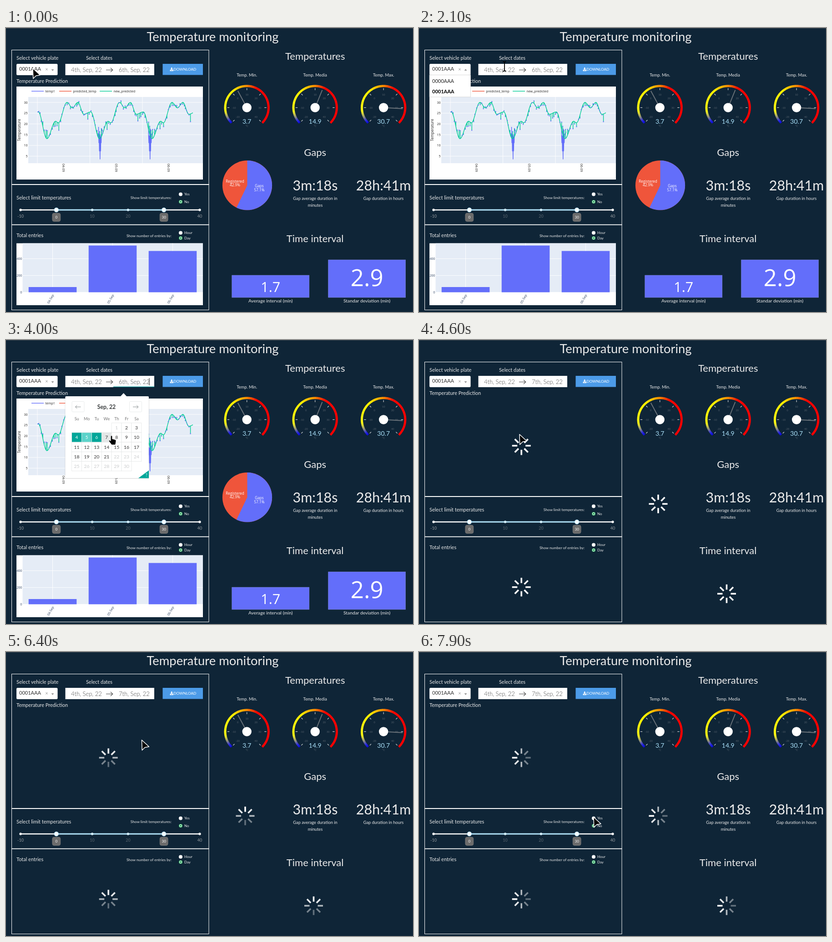
An HTML page that plays this animation: 895x626 px, repeating every 8 s.

```html
<!DOCTYPE html>
<html lang="en">
<head>
<meta charset="utf-8">
<title>Temperature monitoring</title>
<style>
html, body { margin: 0; width: 100%; height: 100%; overflow: hidden; background: #0f2537; }
svg { display: block; width: 895px; height: 626px; font-family: Lato, sans-serif; }
.plot { font-family: "Open Sans", sans-serif; }
</style>
</head>
<body>
<svg id="stage" viewBox="0 0 895 626" xmlns="http://www.w3.org/2000/svg"></svg>
<script>
const LOOP = 8000;
const BLUE = '#636efa', RED = '#ef553b', GREEN = '#00cc96', TEAL = '#00a699';
const LIGHT = '#ebebeb', PALE = '#abe2fb', INK = '#2a3f5f', PLOT = '#e5ecf6';

// Markup helpers
const text = (s, x, y, size, fill = LIGHT, anchor = 'start', extra = '') =>
  `<text x="${x}" y="${y}" font-size="${size}" fill="${fill}" text-anchor="${anchor}" ${extra}>${s}</text>`;
const mid = (s, x, y, size, fill, extra) => text(s, x, y, size, fill, 'middle', extra);
const rect = (x, y, x2, y2, fill, extra = '') =>
  `<rect x="${x}" y="${y}" width="${x2 - x}" height="${y2 - y}" fill="${fill}" ${extra}/>`;
const line = (x1, y1, x2, y2, stroke, w = 1, extra = '') =>
  `<line x1="${x1}" y1="${y1}" x2="${x2}" y2="${y2}" stroke="${stroke}" stroke-width="${w}" ${extra}/>`;
const circle = (x, y, r, fill, extra = '') => `<circle cx="${x}" cy="${y}" r="${r}" fill="${fill}" ${extra}/>`;
const path = (d, fill = 'none', extra = '') => `<path d="${d}" fill="${fill}" ${extra}/>`;
const group = (id, body, extra = '') => `<g id="${id}" ${extra}>${body}</g>`;
const polar = (x, y, r, deg) => {
  const a = deg * Math.PI / 180;
  return [x + r * Math.sin(a), y - r * Math.cos(a)];
};

function randomizer(seed) {
  return () => (seed = (seed * 16807) % 2147483647) / 2147483647;
}

// Piecewise interpolation over rows of [key, value...]
function along(rows, key, ease = u => u) {
  let i = 0;
  while (i < rows.length - 2 && key >= rows[i + 1][0]) i++;
  const a = rows[i], b = rows[i + 1];
  const u = ease(Math.min(1, Math.max(0, (key - a[0]) / (b[0] - a[0]))));
  return a.slice(1).map((v, k) => v + (b[k + 1] - v) * u);
}
const wave = u => (1 - Math.cos(Math.PI * u)) / 2;

function frame() {
  return rect(0, 0, 895, 626, '#0f2537') + rect(0, 0, 895, 1, '#3d4650') +
    mid('Temperature monitoring', 454.5, 28.5, 27.4) +
    rect(12.5, 48.5, 446, 621.5, 'none', 'stroke="#fff"') +
    line(12, 345, 446.5, 345, '#fff', 1.8) + line(12, 433.7, 446.5, 433.7, '#fff', 1.8) +
    text('Select vehicle plate', 23, 70, 11) + mid('Select dates', 205, 70, 11) +
    text('Temperature Prediction', 23, 121.3, 11) +
    mid('Temperatures', 679.7, 70, 22) + mid('Gaps', 679.7, 281.5, 22) +
    mid('Time interval', 679.7, 472, 22) +
    mid('3m:18s', 680, 357.5, 30.5) + mid('28h:41m', 830, 357.5, 30.5) +
    mid('Gap average duration in', 680, 379, 9.3) + mid('minutes', 680, 394, 9.3) +
    mid('Gap duration in hours', 830, 379, 9.3);
}

function controls() {
  return rect(23, 79, 113.5, 104, '#fff', 'rx="2.5"') +
    text('0001AAA', 29, 94.3, 11, '#333') + mid('×', 89.5, 94.6, 11, '#999') +
    path('', '#888', 'id="chevron"') +
    rect(130.5, 79, 326, 104, '#fff') +
    text('4th, Sep, 22', 143, 96.7, 13, '#484848', 'start', 'font-weight="300"') +
    text('6th, Sep, 22', 248, 96.7, 13, '#484848', 'start', 'font-weight="300" id="endDate"') +
    path('M220 92.5H234.5M230 88L234.7 92.5L230 97', 'none', 'stroke="#484848" stroke-width="1.1"') +
    rect(344.5, 79, 433, 103.5, '#4c9be8') +
    path('M363.2 87h2.2v3h2l-3.1 3.1l-3.1-3.1h2zM360.6 92.3h1.7l2 1.6l2-1.6h1.7v2.6h-7.4z', '#fff') +
    text('DOWNLOAD', 368.2, 94.2, 8.3, '#fff');
}

function radio(label, x, y, on) {
  const dot = on
    ? circle(x, y, 4, '#2fae62') + circle(x, y, 2.9, '#d9f7e4') + circle(x, y, 1.8, '#14924a')
    : circle(x, y, 4, '#fff');
  return dot + text(label, x + 8, y + 2.8, 8);
}

function limits() {
  let s = text('Select limit temperatures', 23, 378, 11) +
    text('Show limit temperatures:', 364, 377.2, 8.25, LIGHT, 'end') +
    radio('Yes', 384, 366.5) + radio('No', 384, 383, true) +
    text('Total entries', 23, 461.3, 11) +
    text('Show number of entries by:', 364, 460.5, 8.25, LIGHT, 'end') +
    radio('Hour', 384, 451.5) + radio('Day', 384, 463, true) +
    line(32, 401, 426, 401, '#fff', 2.7) + line(111, 401, 347.5, 401, PALE, 2.7);
  for (let v = -10; v <= 40; v += 10) {
    const x = 32 + (v + 10) * 7.88;
    if (v === 0 || v === 30) {
      s += circle(x, 401, 4.8, '#f4fbff', `stroke="${PALE}" stroke-width="1"`) +
        rect(x - 9, 408, x + 9, 426.5, '#6c6c6c', 'rx="4" stroke="#7b7b7b" stroke-width=".7"') +
        mid(v, x, 420.3, 8, '#fff');
    } else {
      const inside = v > 0 && v < 30;
      s += circle(x, 401, 2.7, inside ? '#d5f1fd' : '#fff') +
        mid(v, x, 418, 9, inside ? '#5c6770' : '#9a9fa3');
    }
  }
  return s;
}

const HEAT = [[0, 10, 10, 215], [.03, 40, 40, 225], [.075, 150, 150, 120], [.13, 255, 250, 20],
  [.36, 255, 240, 0], [.5, 255, 140, 0], [.6, 255, 5, 0], [1, 255, 0, 0]];

function gauge(title, x, value) {
  const y = 175.5, N = 90, angle = u => -135 + 270 * u;
  let s = mid(title, x, 107, 9.3);
  for (let i = 0; i < N; i++) {
    const a = polar(x, y, 47.7, angle(i / N));
    const b = polar(x, y, 47.7, angle(Math.min(1, (i + 1.2) / N)));
    const rgb = along(HEAT, (i + .5) / N).map(Math.round);
    s += line(...a, ...b, `rgb(${rgb})`, 4.8);
  }
  for (let i = 0; i <= 6; i++) {
    const a = angle(i / 6), [lx, ly] = polar(x, y, 28.5, a);
    s += line(...polar(x, y, 38.5, a), ...polar(x, y, 43, a), '#cfd3d6', 1.2) +
      mid(-20 + i * 10, lx, ly + 2, 5.6, '#56626d');
  }
  return s + line(x, y, ...polar(x, y, 42, angle((value + 20) / 60)), '#6b737a', 1.9) +
    circle(x, y, 10.2, '#fff') + mid(value, x, 210.7, 14, PALE) + mid('°C', x, 218, 5.5, '#56626d');
}

// One day of the predicted curve: [pixels after midnight, y]
const DAY = 115.5;
const DAILY = [[2, 185], [21, 244], [40, 205.5], [46, 209], [65, 164], [77, 176], [89, 164],
  [102, 190], [DAY + 2, 185]];
const predicted = x => along(DAILY, x < 2 ? x + DAY : ((x - 2) % DAY) + 2, wave)[0];

function temperatureChart() {
  let s = rect(23, 129, 433, 334, '#fff') + rect(49, 152, 433, 298, PLOT);
  for (let v = 5; v <= 30; v += 5) {
    const y = 164 + (30 - v) * 4.74;
    s += line(49, y, 433, y, '#fff', .9) + text(v, 47.5, y + 2.6, 7, '#222', 'end');
  }
  for (let i = 0; i < 3; i++) {
    const x = 69 + i * DAY, lx = x + DAY / 2;
    s += line(x, 152, x, 298, '#fff', .9) +
      mid(`0${4 + i}-09`, 0, 0, 7, '#222', `transform="translate(${lx - 2.5} 308) rotate(90)"`);
  }
  s += mid('Temperature', 0, 0, 8.2, '#222', 'transform="translate(32 225) rotate(-90)"');
  for (const [x, color, name] of [[56, BLUE, 'temp1'], [117, RED, 'predicted_temp'], [206, GREEN, 'new_predicted']])
    s += line(x, 139.3, x + 27, 139.3, color, 1.4) + text(name, x + 30.5, 142, 7, '#222');

  const rnd = randomizer(417);
  let curve = '', stems = '', dots = '';
  for (let x = 0; x <= 342; x++) curve += `${x ? 'L' : 'M'}${69 + x} ${predicted(x).toFixed(1)}`;
  for (let x = 1; x < 340; x += 2 + rnd() * 2.4) {
    const hour = x % DAY, y = predicted(x);
    const wide = (hour > 10 && hour < 27) || (hour > 36 && hour < 50) || hour > 103;
    const low = wide ? (hour < 27 ? -20 : 18) : 7;
    const end = Math.max(160.5, y + low * rnd() * (wide || rnd() > .3 ? 1 : -1));
    stems += `M${(69 + x).toFixed(1)} ${y.toFixed(1)}V${end.toFixed(1)}`;
    dots += circle((69 + x).toFixed(1), end.toFixed(1), 1.15, BLUE);
  }
  let drops = '';
  for (const x0 of [206.5, 316.5]) {
    drops += `M${x0 - 3} 218`;
    for (let i = 0; i < 11; i++)
      drops += `L${(x0 - 3 + i * .65).toFixed(1)} ${(i % 2 ? 235 + 54 * (1 - Math.abs(i - 5) / 6) : 222 + rnd() * 18).toFixed(1)}`;
    drops += `L${x0 + 7} 229`;
  }
  return s + path(drops, 'none', `stroke="${BLUE}" stroke-width="1.5" stroke-linejoin="round"`) +
    path(stems + curve, 'none', `stroke="${GREEN}" stroke-width="1.4"`) + dots;
}

function entriesChart() {
  let s = rect(23, 474.5, 433, 611, '#fff') + rect(36.5, 474.5, 433, 582.5, PLOT);
  [0, 200, 400].forEach((v, i) => {
    const y = 582.5 - i * 37;
    s += line(36.5, y, 433, y, '#fff', .9) + text(v, 35.2, y + 2.5, 7, INK, 'end');
  });
  [571, 479.5, 491.5].forEach((top, i) => {
    const x = 102.5 + i * 132;
    s += line(x, 474.5, x, 582.5, '#fff', .9) + rect(x - 52.8, top, x + 52.8, 582.5, BLUE) +
      mid(`0${4 + i}-Sep`, 0, 0, 7, INK, `transform="translate(${x - 2.5} 598.5) rotate(-60)"`);
  });
  return s;
}

function pie() {
  const x = 530.5, y = 346.7, r = 54.6, cut = polar(x, y, r, 360 * .571);
  return circle(x, y, r, RED) + path(`M${x} ${y}V${y - r}A${r} ${r} 0 1 1 ${cut}Z`, BLUE) +
    mid('Registered', 503.5, 341, 8.2, '#fff') + mid('42.9%', 503.5, 348.8, 8.2, '#fff') +
    mid('Gaps', 557, 350.7, 8.2, '#fff') + mid('57.1%', 557, 360, 8.2, '#fff');
}

const card = (value, label, x, top, size, base) =>
  rect(x - 85, top, x + 85, 594, BLUE, 'stroke="#8088d8" stroke-width=".6"') +
  mid(value, x, base, size, '#fff', 'class="plot"') + mid(label, x, 604.5, 10.3);

const spinner = (x, y) => Array.from({ length: 8 }, (_, i) =>
  line(0, -9, 0, -20.5, '#fff', 3.6, `class="spoke" transform="translate(${x} ${y}) rotate(${i * 45})"`)).join('');

function menu() {
  return rect(23, 103.5, 113.5, 152, '#fff', 'stroke="#ccc" stroke-width=".7"') +
    text('0000AAA', 29, 120.5, 11, '#222') +
    text('0001AAA', 29, 144, 11, '#000', 'start', 'font-weight="700"');
}

function calendar() {
  const cw = 21.9, ch = 21.2, edge = 'stroke="#e4e7e7" stroke-width=".8"';
  let s = rect(129.5, 124, 315, 306, '#000', 'opacity=".12" rx="3"') +
    rect(130.3, 124, 314, 304.5, '#fff', 'rx="2"') + path('M-7 124.5L0 117L7 124.5Z', '#fff', 'id="fang"') +
    mid('Sep, 22', 221, 152, 12.3, '#3c3f40', 'font-weight="700"') +
    rect(145, 135.5, 172, 158.5, '#fff', `${edge} rx="2"`) + rect(271.5, 135.5, 298.5, 158.5, '#fff', `${edge} rx="2"`) +
    path('M164.5 147.5H152.5M156.5 143.7L152.5 147.5L156.5 151.3M279 147.5H291M287 143.7L291 147.5L287 151.3',
      'none', 'stroke="#82888a" stroke-width=".9"');
  ['Su', 'Mo', 'Tu', 'We', 'Th', 'Fr', 'Sa'].forEach((d, i) => s += mid(d, 155.7 + i * cw, 177, 9, '#757575'));
  for (let day = 1; day <= 30; day++) {
    const col = (day + 3) % 7, row = Math.floor((day + 3) / 7);
    const x = 144.6 + col * cw, y = 182.8 + row * ch;
    const fill = { 4: TEAL, 5: '#5cd3ca', 6: TEAL }[day] || '#fff';
    const ink = day === 4 || day === 5 ? '#fff' : day === 6 ? '#f2fffd' : day === 1 || day > 21 ? '#cacccd' : '#333';
    s += rect(x, y, x + cw, y + ch, fill, edge + (day === 7 ? ' id="day7"' : '')) +
      mid(day, x + cw / 2, y + 14.3, 10.3, ink);
  }
  return s + path('M314 287.5V304.5H291Z', TEAL) + mid('?', 309, 301, 8.5, '#fff');
}

const outline = 'stroke="#fff" stroke-width="1.5" stroke-linejoin="round"';
const CURSORS =
  group('arrow', path('M0 0L.8 22.5L7 16.2L16 14.8Z', '#000', outline)) +
  group('beam', path('M-3.5 -10.5Q0 -10.5 0 -8.5Q0 -10.5 3.5 -10.5M0 -9V9M-3.5 10.5Q0 10.5 0 8.5Q0 10.5 3.5 10.5',
    'none', 'stroke="#000" stroke-width="1.8"')) +
  group('hand', path('M-1.8 1Q0 -1.5 1.8 1V7L8 8.6Q10.3 9.3 10 11.8L8.6 20H.4L-5.6 12.2Q-6.3 9.8 -4 9.8L-1.8 11.6Z',
    '#000', 'stroke="#fff" stroke-width=".8" stroke-linejoin="round"'));

const stage = document.getElementById('stage');
stage.innerHTML = frame() + controls() + limits() +
  gauge('Temp. Min.', 529.7, 3.7) + gauge('Temp. Media', 679.7, 14.9) + gauge('Temp. Max.', 830.2, 30.7) +
  group('data', group('plots', temperatureChart() + entriesChart() + pie(), 'class="plot"') +
    card('1.7', 'Average interval (min)', 581.8, 545, 30.5, 581.5) +
    card('2.9', 'Standar deviation (min)', 793.7, 511, 51, 569)) +
  group('loading', spinner(225.2, 233) + spinner(225.2, 544.7) + spinner(526, 361.3) + spinner(676.5, 559.3)) +
  group('menu', menu()) +
  group('picker', calendar() + rect(0, 102.6, 90, 104, '#008489', 'id="underline"') +
    rect(0, 84, 1, 100, '#111', 'id="caret"')) +
  group('cursor', CURSORS);

const el = id => document.getElementById(id);
const show = (id, on) => { el(id).style.display = on ? '' : 'none'; };
const move = (id, x, y = 0) => el(id).setAttribute('transform', `translate(${x} ${y})`);
const spokes = [...document.querySelectorAll('.spoke')];

// Pointer path: [ms, x, y]
const POINTER = [[0, 59, 89], [1100, 59, 89], [1500, 59.5, 126], [1700, 59.5, 126], [2100, 188, 84.5],
  [2800, 188, 84.5], [3400, 154, 211], [3500, 154, 211], [4000, 232, 211], [4100, 232, 211],
  [4600, 221, 208], [4800, 221, 208], [5200, 213, 182], [5700, 236, 167], [6400, 298.5, 194],
  [6600, 317, 218], [7100, 383, 341.5], [7500, 384, 354], [7900, 384, 364]];
const SPIN = [[4400, -1], [6400, 0], [7100, .42], [7900, .75]];

function draw(ms) {
  const t = Math.floor(ms / 100) * 100;
  const open = t >= 800 && t < 2300, picking = t >= 2300 && t < 4200, busy = t >= 4300;
  const atEnd = t >= 3600;
  const [x, y] = along(POINTER, t);

  show('menu', open);
  el('chevron').setAttribute('d', open ? 'M99.5 93.8h6l-3-3.2z' : 'M99.5 91.3h6l-3 3.2z');
  show('picker', picking);
  move('fang', atEnd ? 258.5 : 152.5);
  move('underline', atEnd ? 236 : 130.5);
  move('caret', atEnd ? 314.5 : 209.5);
  el('day7').setAttribute('fill', t >= 3900 ? '#e4e7e7' : '#fff');
  el('endDate').textContent = t >= 4200 ? '7th, Sep, 22' : '6th, Sep, 22';
  show('data', !busy);
  show('loading', busy);

  const turn = along(SPIN, t)[0];
  spokes.forEach((s, i) => {
    const phase = turn + 1 - (i % 8) / 8;
    s.setAttribute('opacity', t < 4900 || phase < 0 ? 1 : .67 + .33 * Math.cos(2 * Math.PI * phase));
  });

  const hand = picking && y > 182;
  const beam = !hand && x > 130 && y > 78 && y < 104;
  show('hand', hand);
  show('beam', beam);
  show('arrow', !hand && !beam);
  move('cursor', x, y);
}

const start = performance.now();
function tick(now) {
  draw(Math.max(0, now - start) % LOOP);
  requestAnimationFrame(tick);
}
draw(0);
requestAnimationFrame(tick);
</script>
</body>
</html>
```
